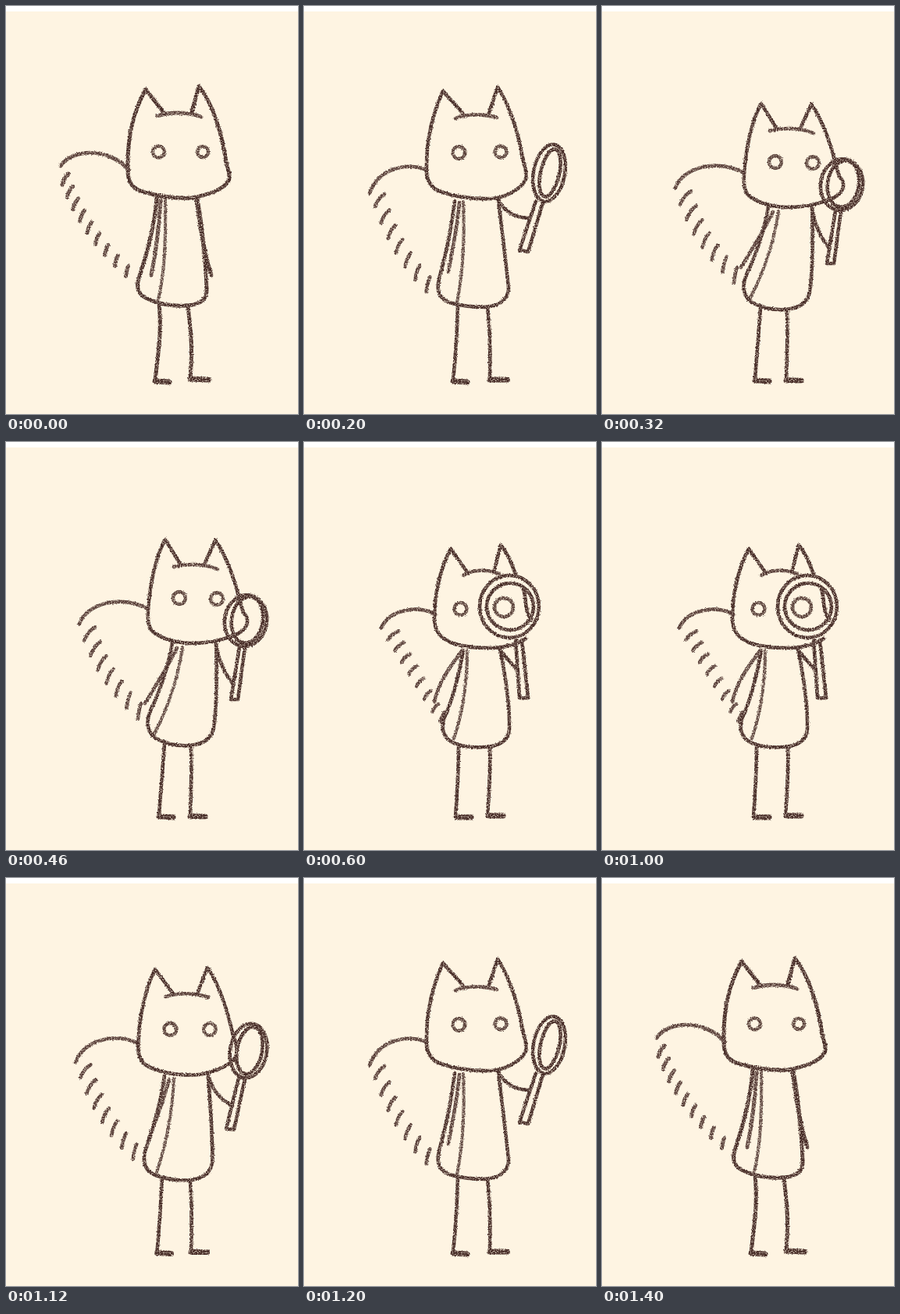
Write an HTML page that moves like this. It is 374x523 px and loops after 1.6 s.

```html
<!DOCTYPE html>
<html lang="en">
<head>
<meta charset="utf-8">
<title>Cat with a magnifying glass</title>
<style>
  html, body { margin: 0; width: 100%; height: 100%; overflow: hidden; background: #fff; }
  svg { display: block; width: 374px; height: 523px; }
  .ink { fill: none; stroke: #452a25; stroke-linecap: round; stroke-linejoin: round; filter: url(#crayon); }
</style>
</head>
<body>
<svg id="stage" viewBox="0 0 374 523">
  <filter id="crayon" filterUnits="userSpaceOnUse" x="0" y="0" width="374" height="523" color-interpolation-filters="sRGB">
    <feTurbulence type="fractalNoise" baseFrequency=".6" numOctaves="2" seed="4" result="noise"/>
    <feDisplacementMap in="SourceGraphic" in2="noise" scale="3" xChannelSelector="R" yChannelSelector="G" result="rough"/>
    <feColorMatrix in="noise" values="0 0 0 0 0  0 0 0 0 0  0 0 0 0 0  0 0 2.2 0 -.22" result="grain"/>
    <feComposite in="rough" in2="grain" operator="in"/>
    <feGaussianBlur stdDeviation=".45"/>
  </filter>
  <rect y="7" width="374" height="516" fill="#fef4e2"/>
</svg>
<script>
const LOOP = 1600, FRAMES = 24;

// eyes: x y r each; glass: x y rx ry angle each; dashes: curve of centres, then first and last stroke vectors
const rest = {
  width: '5', count: 9,
  head: 'M203 138 L179 107 C163 135 155 170 156 210 C156 225 160 233 175 238 C195 244 215 247 238 246 C258 242 280 236 286 222 C288 214 283 208 282 200 C277 165 265 125 247 103 L238 136',
  brow: 'M194 141 C208 136 232 135 250 142',
  body: 'M193 247 C190 285 178 325 171 346 C165 364 170 371 185 377 C200 383 215 385 230 384 C250 383 258 376 257 362 C256 330 251 280 245 248',
  armLeft: 'M198 249 C196 290 191 320 186 345',
  seam: 'M204 249 C205 300 203 345 195 376',
  armRight: 'M244 248 C248 280 255 320 263 345',
  legs: 'M196 381 C200 420 194 450 191 481 M233 386 C239 430 238 450 236 478',
  feet: 'M191 481 L209 482 M236 478 L259 479',
  tail: 'M70 205 C82 184 132 180 157 210',
  dashes: '76 222 98 287 155 340 8 -14 3 -13',
  eyes: '195.5 187 7.5 252 187 7',
  glass: '289 287 20 37 11 290 287 12 31 13',
  handle: 'M272 323 L251 386 L262 388 L281 325'
};

const raised = {
  width: '4.6', count: 7,
  head: 'M203 137 L178 109 C164 140 157 175 157 205 C156 218 158 225 167 234 C180 242 210 248 240 247 C258 246 280 233 284 222 C286 212 281 200 279 190 C274 160 262 125 248 104 L237 137',
  brow: 'M194 144 C208 138 230 138 247 143',
  body: 'M193 250 C189 285 180 325 173 350 C169 366 174 375 186 380 C200 384 215 386 230 386 C250 385 262 376 262 362 C259 330 253 285 249 250',
  armLeft: 'M199 252 C196 290 189 315 185 341',
  seam: 'M204 251 C206 300 203 345 196 380',
  armRight: 'M250 250 C257 264 270 271 288 272',
  legs: 'M197 383 C196 425 194 450 191 481 M235 386 C240 430 238 450 238 479',
  feet: 'M191 481 L209 482 M238 479 L260 479',
  tail: 'M84 240 C96 208 130 200 157 210',
  dashes: '97 249 116 313 159 357 12 -16 5 -19',
  eyes: '198.5 188 8 252 187 7.5',
  glass: '314 214 20 37 11 315 214 12 31 13',
  handle: 'M297 250 L276 313 L287 315 L306 252'
};

const close = {
  width: '4.6', count: 7,
  head: 'M224 158 L204 125 C192 145 184 185 182 215 C181 232 183 241 192 246 C203 253 220 258 240 258 C260 258 285 252 298 245 C311 238 312 226 304 219 C296 190 286 150 268 126 L254 157',
  brow: 'M215 160 C230 156 252 155 271 163',
  body: 'M213 257 C209 285 196 322 186 342 C178 360 181 372 192 380 C205 387 220 390 235 389 C255 388 266 378 267 360 C270 330 270 290 269 258',
  armLeft: 'M219 264 C206 290 190 315 178 335',
  seam: 'M226 263 C220 305 205 345 190 374',
  armRight: 'M269 259 C272 282 281 298 292 312',
  legs: 'M203 387 C200 425 198 450 196 479 M237 390 C238 430 237 450 236 480',
  feet: 'M196 480 L214 481 M236 480 L255 480',
  tail: 'M94 233 C105 205 150 196 182 214',
  dashes: '107 246 127 305 171 345 14 -17 4 -20',
  eyes: '222 200 8 270 201 8',
  glass: '307 229 27 33 9 309 228 20 30 9',
  handle: 'M299 263 L288 330 L297 330 L306 263'
};

const peering = {
  width: '4.6', count: 7,
  head: 'M210 168 L188 137 C175 160 167 195 167 225 C167 242 173 250 188 257 C205 263 220 264 235 264 C255 264 272 260 284 252 M281 188 C285 200 282 214 291 228 M271 170 C266 155 260 142 252 132 L243 167',
  brow: 'M204 171 C215 163 235 163 250 169',
  body: 'M204 267 C198 300 192 325 182 348 C174 364 177 378 190 385 C203 391 215 392 230 391 C250 390 262 384 263 368 C264 335 258 300 251 265',
  armLeft: 'M202 268 C184 292 172 310 167 333 M174 358 L180 346',
  seam: 'M209 267 C209 310 204 345 192 380',
  armRight: 'M250 265 L274 294',
  legs: 'M198 391 C198 425 196 450 194 481 M238 391 C239 430 237 450 235 480',
  feet: 'M196 481 L214 481 M236 479 L255 479',
  tail: 'M99 238 C110 215 145 208 168 221',
  dashes: '114 248 138 290 168 341 13 -11 7 -10',
  eyes: '200.5 214 8 256 212 12',
  glass: '263 211 38 40 0 264 211 30 30 0',
  handle: 'M271 254 L276 328 L287 328 L279 254'
};

const numbers = text => text.match(/-?[\d.]+/g).map(Number);
const lerp = (a, b, t) => a + (b - a) * t;

function mix(from, to, t) {
  const pose = { count: t < .5 ? from.count : to.count };
  for (const part in from) {
    if (part === 'count') continue;
    const target = numbers(to[part]);
    let i = 0;
    pose[part] = from[part].replace(/-?[\d.]+/g, n => lerp(+n, target[i++], t).toFixed(1));
  }
  return pose;
}

const path = (d, attrs = '') => `<path d="${d}" ${attrs}/>`;
const ellipse = (x, y, rx, ry, angle = 0) =>
  `<ellipse cx="${x}" cy="${y}" rx="${rx}" ry="${ry}" transform="rotate(${angle} ${x} ${y})"/>`;

function dashes({ dashes, count }) {
  const [x0, y0, cx, cy, x1, y1, u0, v0, u1, v1] = numbers(dashes);
  const curve = (a, c, b, t) => lerp(lerp(a, c, t), lerp(c, b, t), t);
  let d = '';
  for (let i = 0; i < count; i++) {
    const t = i / (count - 1), u = lerp(u0, u1, t), v = lerp(v0, v1, t);
    const x = curve(x0, cx, x1, t) - u / 2, y = curve(y0, cy, y1, t) - v / 2;
    d += `M${x} ${y} q${u * .3} ${v * .65} ${u} ${v}`;
  }
  return path(d, 'stroke-opacity=".9"');
}

function draw(pose, hasGlass) {
  const [lx, ly, lr, rx, ry, rr] = numbers(pose.eyes), glass = numbers(pose.glass);
  return `<g class="ink" stroke-width="${pose.width}">` +
    ['head', 'body', 'armRight', 'legs'].map(part => path(pose[part])).join('') +
    ['tail', 'brow', 'armLeft'].map(part => path(pose[part], 'stroke-opacity=".9"')).join('') +
    path(pose.seam, 'stroke-width="4" stroke-opacity=".85"') +
    path(pose.feet, 'stroke-width="7"') + dashes(pose) +
    `<g stroke-width="4.4" stroke-opacity=".9">${ellipse(lx, ly, lr, lr)}${ellipse(rx, ry, rr, rr)}</g>` +
    (hasGlass ? ellipse(...glass.slice(0, 5)) + ellipse(...glass.slice(5)) + path(pose.handle) : '') +
    '</g>';
}

const drawings = [
  draw(rest, false),
  draw(mix(rest, raised, 1 / 3), false),
  draw(mix(rest, raised, 2 / 3), true),
  draw(raised, true),
  draw(mix(raised, close, .5), true),
  draw(close, true),
  draw(peering, true)
];

// One digit per frame, naming the drawing on show
const order = [...'012345655655655654321000'].map(Number);
const startOf = frame => Math.floor(frame * LOOP / FRAMES / 20) * 20;
const stage = document.getElementById('stage');

drawings.forEach((markup, id) => {
  const layer = document.createElementNS('http://www.w3.org/2000/svg', 'g');
  layer.innerHTML = markup;
  stage.append(layer);
  const steps = order.map((shown, frame) => ({
    offset: startOf(frame) / LOOP, opacity: shown === id ? 1 : 0, easing: 'step-end'
  }));
  steps.push({ offset: 1, opacity: steps[0].opacity });
  layer.animate(steps, { duration: LOOP, iterations: Infinity });
});
</script>
</body>
</html>
```
